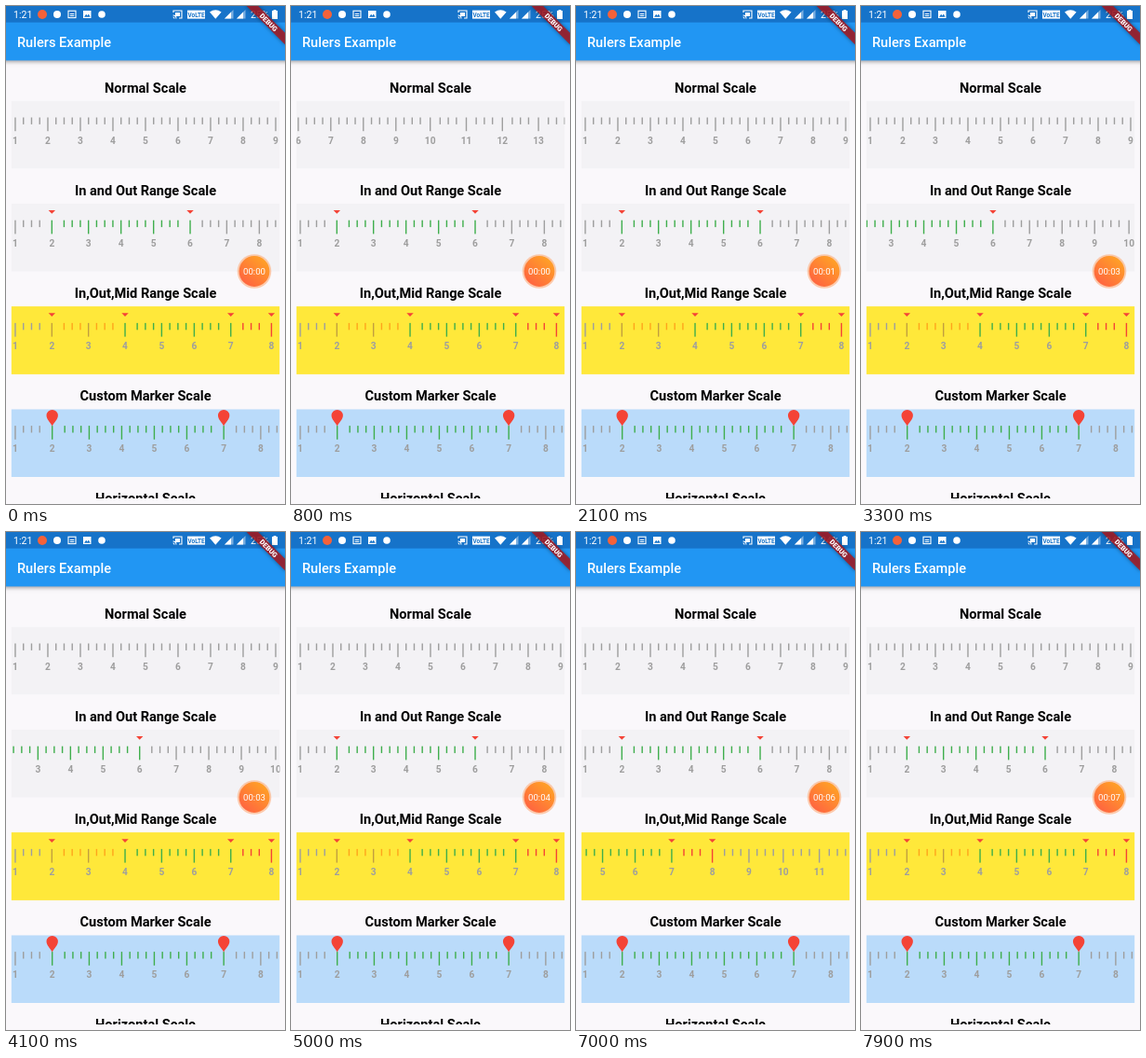
Recreate the animation shown at these times as an HTML page with a canvas. Size 300 by 534 pixels, loop 8000 ms.

```html
<!DOCTYPE html>
<html lang="en">
<head>
<meta charset="utf-8">
<title>Rulers Example</title>
<style>
html, body { margin: 0; width: 100%; height: 100%; overflow: hidden; background: #faf8fb; }
canvas { display: block; width: 300px; height: 534px; }
</style>
</head>
<body>
<canvas id="stage"></canvas>
<script>
const W = 300, H = 534, LOOP = 8000;
const PAGE = '#faf8fb', GREY = '#9e9e9e', GREEN = '#3fae4c', ORANGE = '#ffa41c', RED = '#f44336';
const LEFT = 5.6, RIGHT = 294.4, STEP = 8.75;

const canvas = document.getElementById('stage');
const c = canvas.getContext('2d');
const dpr = window.devicePixelRatio || 1;
canvas.width = W * dpr;
canvas.height = H * dpr;

// Each swipe runs to the end of the scale, rests there, then returns.
const rulers = [
  { title: 'Normal Scale', last: 14, fill: '#f3f2f5', marks: [], color: () => GREY,
    swipe: [550, 1000, 1550, 1950] },
  { title: 'In and Out Range Scale', last: 10, fill: '#f3f2f5', marks: [2, 6],
    color: v => v >= 2 && v <= 6 ? GREEN : GREY,
    swipe: [3100, 3280, 4050, 4450] },
  { title: 'In,Out,Mid Range Scale', last: 12, fill: '#ffe83a', marks: [2, 4, 7, 8],
    color: rangeColor, swipe: [5850, 6250, 6900, 7400] },
  { title: 'Custom Marker Scale', last: 10, fill: '#badbfa', marks: [2, 7], pin: true,
    color: v => v >= 2 && v <= 7 ? GREEN : GREY }
];
rulers.forEach(layout);

function rangeColor(v) {
  if (v < 2 || v > 8) return GREY;
  if (v < 4) return v % 1 ? ORANGE : '#c29f3f';
  return v <= 7 ? GREEN : RED;
}

// Items are as wide as their widest part: tick, label or marker.
function layout(r) {
  let x = LEFT;
  r.ticks = [];
  for (let v = 1; v <= r.last; v += 0.25) {
    const major = v % 1 === 0, marked = r.marks.includes(v);
    let w = STEP;
    if (major && v > 9) w = 12.55;
    if (marked) w = r.pin ? 18.2 : 17.45;
    r.ticks.push({ v, major, marked, x: x + w / 2 });
    x += w;
  }
  r.max = x - RIGHT;
}

const clamp = k => Math.min(1, Math.max(0, k));
const easeOut = k => 1 - (1 - k) ** 3;
const easeInOut = k => k < 0.5 ? 2 * k * k : 1 - 2 * (1 - k) ** 2;

function offset(r, t) {
  if (!r.swipe) return 0;
  const [a, b, d, e] = r.swipe;
  return r.max * (easeOut(clamp((t - a) / (b - a))) - easeInOut(clamp((t - d) / (e - d))));
}

function rect(x, y, w, h, color) {
  c.fillStyle = color;
  c.fillRect(x, y, w, h);
}

function disc(x, y, r, color) {
  c.fillStyle = color;
  c.beginPath();
  c.arc(x, y, r, 0, Math.PI * 2);
  c.fill();
}

function poly(color, ...p) {
  c.fillStyle = color;
  c.beginPath();
  for (let i = 0; i < p.length; i += 2) c.lineTo(p[i], p[i + 1]);
  c.closePath();
  c.fill();
}

function text(s, x, y, size, weight, color, align = 'center') {
  c.font = `${weight} ${size}px Roboto, sans-serif`;
  c.textAlign = align;
  c.fillStyle = color;
  c.fillText(s, x, y);
}

function clipTo(x, y, w, h) {
  c.save();
  c.beginPath();
  c.rect(x, y, w, h);
  c.clip();
}

function pin(x, y) {
  c.fillStyle = RED;
  c.beginPath();
  c.moveTo(x, y + 17.6);
  c.bezierCurveTo(x - 2, y + 13.5, x - 6.2, y + 10.5, x - 6.2, y + 6.2);
  c.arc(x, y + 6.2, 6.2, Math.PI, 0);
  c.bezierCurveTo(x + 6.2, y + 10.5, x + 2, y + 13.5, x, y + 17.6);
  c.fill();
}

function ruler(r, y, t) {
  const shift = offset(r, t);
  clipTo(LEFT, y, RIGHT - LEFT, 72.8);
  rect(LEFT, y, RIGHT - LEFT, 72.8, r.fill);
  for (const k of r.ticks) {
    const x = k.x - shift;
    if (x < -10 || x > W + 10) continue;
    rect(x - 0.7, y + 17.8, 1.4, k.major ? 14.7 : 7.4, r.color(k.v));
    if (k.major) text(k.v, x, y + 45.9, 10.2, 700, GREY);
    if (!k.marked) continue;
    if (r.pin) pin(x, y + 0.6);
    else poly(RED, x - 3.7, y + 7.1, x + 3.7, y + 7.1, x, y + 10.9);
  }
  c.restore();
}

function cast() {
  c.strokeStyle = '#fff';
  c.lineWidth = 1.1;
  c.beginPath();
  c.moveTo(180, 7);
  c.lineTo(180, 5);
  c.lineTo(189, 5);
  c.lineTo(189, 13);
  c.lineTo(186, 13);
  c.stroke();
  rect(182, 7, 5, 4, '#fff');
  for (const r of [1.4, 3.4]) {
    c.beginPath();
    c.arc(179.6, 13.4, r, -Math.PI / 2, 0);
    c.stroke();
  }
}

function statusBar(t) {
  rect(0, 0, W, 17.6, '#1673c9');
  text('1:21', 8, 13, 10.6, 400, '#fff', 'left');
  disc(39, 9, 5, '#f4623a');
  disc(55, 9, 4, '#fff');

  c.strokeStyle = '#fff';
  c.lineWidth = 1.1;
  c.strokeRect(67, 5.2, 8, 7.4);
  rect(68.8, 8, 4.4, 1, '#fff');
  rect(68.8, 10, 4.4, 1, '#fff');
  rect(83, 5, 8.5, 8, '#fff');
  poly('#1673c9', 84, 11.8, 86.2, 8.8, 87.5, 10.4, 88.8, 8.4, 90.6, 11.8);
  disc(103, 9, 3.8, '#fff');

  cast();
  rect(195, 4.6, 19, 9, '#fff');
  text('VoLTE', 204.5, 11.6, 6.4, 700, '#1673c9');

  c.fillStyle = '#fff';
  c.beginPath();
  c.moveTo(225.3, 13.8);
  c.lineTo(219, 6.5);
  c.quadraticCurveTo(225.3, 2.2, 231.6, 6.5);
  c.fill();
  for (const x of [235, 248]) {
    poly('#ffffff70', x, 13.5, x + 9.5, 13.5, x + 9.5, 4);
    poly('#fff', x, 13.5, x + 7, 13.5, x + 7, 6.5);
  }
  text(t < 7000 ? '25%' : '24%', 263, 13, 10.6, 400, '#fff', 'left');
  rect(286, 5, 6, 9, '#fff');
  rect(287.6, 4, 2.8, 1, '#fff');
}

function appBar() {
  c.save();
  c.shadowColor = 'rgba(0,0,0,.35)';
  c.shadowBlur = 4 * dpr;
  c.shadowOffsetY = 1.5 * dpr;
  rect(-5, 17, W + 10, 41.4, '#2196f3');
  c.restore();
  text('Rulers Example', 12, 43.6, 14.6, 500, '#fff', 'left');
}

function banner() {
  c.save();
  c.translate(W, 0);
  c.rotate(Math.PI / 4);
  c.shadowColor = 'rgba(0,0,0,.5)';
  c.shadowBlur = 4 * dpr;
  rect(-30, 20.4, 60, 8.8, 'rgba(167,27,36,.85)');
  c.shadowColor = 'transparent';
  text('DEBUG', 0, 27.5, 7.4, 900, '#fff');
  c.restore();
}

function bubble(t) {
  const x = 267, y = 284.5;
  const g = c.createLinearGradient(x - 11, y + 13, x + 11, y - 13);
  g.addColorStop(0, '#ff6540');
  g.addColorStop(1, '#ffa126');
  disc(x, y, 18.3, 'rgba(255,166,110,.55)');
  disc(x, y, 16.4, g);
  const s = Math.max(0, Math.floor((t - 200) / 1000));
  text('00:' + String(s).padStart(2, '0'), x, y + 3.5, 9.7, 400, '#fff');
}

function draw(t) {
  c.setTransform(dpr, 0, 0, dpr, 0, 0);
  rect(0, 0, W, H, PAGE);
  clipTo(0, 58, W, 470);
  rulers.forEach((r, i) => {
    const y = 101.7 + i * 110.2;
    text(r.title, 150, y - 9.2, 14.6, 700, '#000');
    ruler(r, y, t);
  });
  text('Horizontal Scale', 150, 533.2, 14.6, 700, '#000');
  c.restore();
  appBar();
  statusBar(t);
  banner();
  bubble(t);
}

const start = performance.now();
function frame() {
  draw((performance.now() - start) % LOOP);
  requestAnimationFrame(frame);
}
frame();
</script>
</body>
</html>
```
